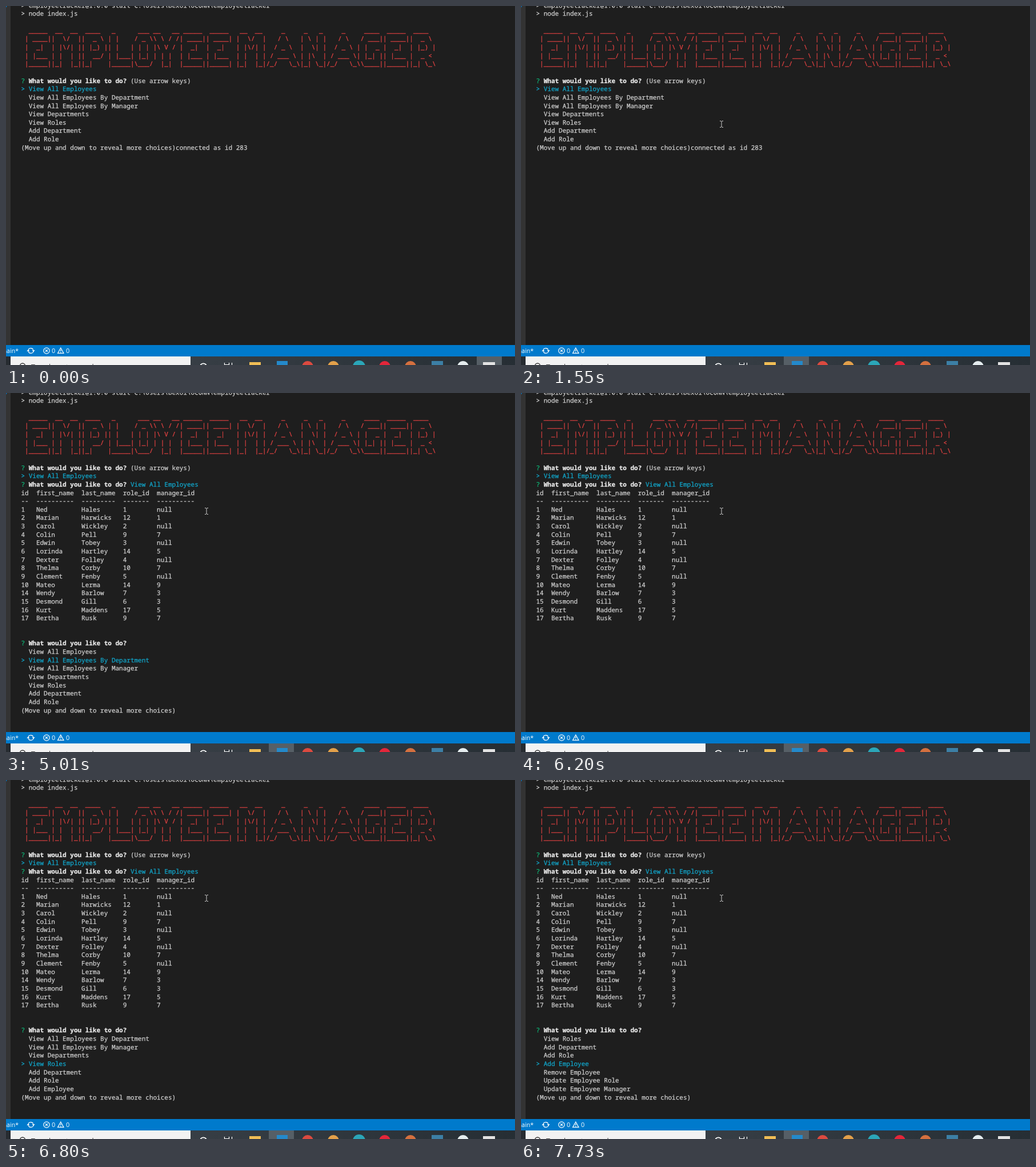
An HTML page for the animation above (7.99 s loop, 891 by 629 pixels).

```html
<!DOCTYPE html>
<html lang="en">
<head>
<meta charset="utf-8">
<title>Terminal menu</title>
<style>
  :root { --lh: 14.655px; --loop: 7990ms; --bg: #1e1e1e; }
  html, body { margin: 0; width: 100%; height: 100%; overflow: hidden; background: var(--bg); }
  #stage { position: relative; width: 891px; height: 629px; overflow: hidden; background: var(--bg); }

  pre {
    position: absolute; left: 26.5px; top: calc(7.3px + var(--row) * var(--lh)); margin: 0;
    font: 11px/14.655px "Noto Sans Mono", "DejaVu Sans Mono", monospace;
    text-rendering: geometricPrecision; font-variant-ligatures: none;
    color: #d0d0d0; -webkit-text-stroke: .25px;
  }
  b { color: #e8e8e8; }
  .red { color: #dc4040; -webkit-text-stroke: .35px; }
  .ask { color: #0dbc79; }
  .hot { color: #11a8cd; }

  /* every timeline shares one loop and jumps between states */
  .first, .second, .hint, .menu, .list, .pick, .lit, .beam, .arrow {
    animation: var(--loop) step-end infinite;
  }
  .first { animation-name: first; }
  .second { animation-name: second; }
  .hint { animation-name: hint; }
  .menu { animation-name: redraw; }

  .view { position: absolute; left: 0; top: var(--lh); width: 330px; height: calc(7 * var(--lh)); overflow: hidden; }
  .list { position: absolute; left: 13.2px; top: 0; animation-name: scroll; }
  .pick {
    position: absolute; left: 0; top: 0; width: 100%; height: var(--lh);
    overflow: hidden; background: var(--bg); color: #11a8cd; animation-name: move;
  }
  .pick .list { animation-name: choose; }

  @keyframes first { 0% { visibility: visible } 37.67%, 100% { visibility: hidden } }
  @keyframes second { 0% { opacity: 0 } 37.67%, 100% { opacity: 1 } }
  @keyframes hint { 0% { opacity: 1 } 62.7%, 100% { opacity: 0 } }
  @keyframes redraw {
    0%, 78.34%, 94.24%, 100% { visibility: visible }
    77.59%, 93.36% { visibility: hidden }
  }
  @keyframes scroll {
    0% { top: 0 }
    85.1% { top: calc(-1 * var(--lh)) }
    90.86% { top: calc(-2 * var(--lh)) }
    94.24% { top: calc(-3 * var(--lh)) }
    96.74%, 100% { top: calc(-4 * var(--lh)) }
  }
  @keyframes move {
    0% { top: 0 }
    62.7% { top: var(--lh) }
    78.34% { top: calc(2 * var(--lh)) }
    81.72%, 100% { top: calc(3 * var(--lh)) }
  }
  @keyframes choose {
    0% { top: 0 }
    62.7% { top: calc(-1 * var(--lh)) }
    78.34% { top: calc(-2 * var(--lh)) }
    81.72% { top: calc(-3 * var(--lh)) }
    85.1% { top: calc(-4 * var(--lh)) }
    90.86% { top: calc(-5 * var(--lh)) }
    94.24% { top: calc(-6 * var(--lh)) }
    96.74%, 100% { top: calc(-7 * var(--lh)) }
  }

  #chrome { position: absolute; left: 0; top: 0; }
  #chrome text { font-family: "Open Sans", "Noto Sans", sans-serif; font-size: 11px; fill: #fff; }
  .line { fill: none; stroke: #fff; stroke-width: 1.2; }
  .lit { fill: #565f66; }
  .mail { animation-name: dim; }
  .code { animation-name: glow; }
  @keyframes dim { 0% { opacity: 1 } 10.01% { opacity: .5 } 10.76%, 100% { opacity: 0 } }
  @keyframes glow { 0% { opacity: 0 } 10.01% { opacity: .5 } 10.76%, 100% { opacity: 1 } }

  .arrow { animation-name: arrow; }
  @keyframes arrow { 0%, 1.62%, 100% { visibility: hidden } .87% { visibility: visible } }
  .beam { animation-name: beam; }
  @keyframes beam {
    0% { transform: translate(502px, 133px); opacity: 0 }
    13.26% { transform: translate(502px, 133px); opacity: 1 }
    14.14% { transform: translate(462px, 123px); opacity: 1 }
    15.01% { transform: translate(377px, 100px); opacity: 1 }
    15.89% { transform: translate(261px, 69px); opacity: 1 }
    16.77% { transform: translate(151px, 40px); opacity: 1 }
    17.64% { transform: translate(70px, 19px); opacity: 1 }
    18.52% { transform: translate(20px, 5px); opacity: 1 }
    19.39%, 100% { transform: none; opacity: 1 }
  }
</style>
</head>
<body>
<div id="stage">
<pre style="--row:-1">
&gt; employeetracker@1.0.0 start C:\Users\bexol\UCONN\employeetracker
&gt; node index.js

<span class="red">  _____  __  __  ____   _      ___ __   __ _____  _____   __  __     _     _   _     _     ____  _____  ____  
 | ____||  \/  ||  _ \ | |    / _ \\ \ / /| ____|| ____| |  \/  |   / \   | \ | |   / \   / ___|| ____||  _ \ 
 |  _|  | |\/| || |_) || |   | | | |\ V / |  _|  |  _|   | |\/| |  / _ \  |  \| |  / _ \ | |  _ |  _|  | |_) |
 | |___ | |  | ||  __/ | |___| |_| | | |  | |___ | |___  | |  | | / ___ \ | |\  | / ___ \| |_| || |___ |  _ &lt; 
 |_____||_|  |_||_|    |_____|\___/  |_|  |_____||_____| |_|  |_|/_/   \_\|_| \_|/_/   \_\\____||_____||_| \_\</span>

<span class="ask">?</span> <b>What would you like to do?</b> (Use arrow keys)
<span class="hot">&gt; View All Employees</span></pre>

<pre class="first" style="--row:10">
  View All Employees By Department
  View All Employees By Manager
  View Departments
  View Roles
  Add Department
  Add Role
(Move up and down to reveal more choices)connected as id 283</pre>

<div class="second">
<pre style="--row:10">
<span class="ask">?</span> <b>What would you like to do?</b> <span class="hot">View All Employees</span>
id  first_name  last_name  role_id  manager_id
--  ----------  ---------  -------  ----------
1   Ned         Hales      1        null
2   Marian      Harwicks   12       1
3   Carol       Wickley    2        null
4   Colin       Pell       9        7
5   Edwin       Tobey      3        null
6   Lorinda     Hartley    14       5
7   Dexter      Folley     4        null
8   Thelma      Corby      10       7
9   Clement     Fenby      5        null
10  Mateo       Lerma      14       9
14  Wendy       Barlow     7        3
15  Desmond     Gill       6        3
16  Kurt        Maddens    17       5
17  Bertha      Rusk       9        7</pre>
<pre class="menu" style="--row:29"><span class="ask">?</span> <b>What would you like to do?</b> <span class="hint">(Use arrow keys)</span>







(Move up and down to reveal more choices)<div class="view"><div class="list">View All Employees
View All Employees By Department
View All Employees By Manager
View Departments
View Roles
Add Department
Add Role
Add Employee
Remove Employee
Update Employee Role
Update Employee Manager</div><div class="pick">&gt;</div></div></pre>
</div>

<svg id="chrome" width="891" height="629" viewBox="0 0 891 629">
  <defs>
    <linearGradient id="bar"><stop stop-color="#373e45"/><stop offset="1" stop-color="#262e34"/></linearGradient>
  </defs>
  <rect width="8" height="594" fill="#333"/>
  <circle cx="-4" cy="-2" r="6" fill="#007acc"/>

  <rect y="594" width="891" height="20" fill="#007acc"/>
  <text x="22" y="608" text-anchor="end" style="font-size:10.6px">main*</text>
  <g class="line">
    <path d="M38.8 603.5a4.7 4.7 0 0 1 9-1M48.2 604.5a4.7 4.7 0 0 1-9 1"/>
    <circle cx="71" cy="604" r="5.2"/>
    <path d="M68.8 601.8l4.4 4.4m0-4.4l-4.4 4.4"/>
    <path d="M95.8 599l5.2 9.4h-10.4zM95.8 602v3.2m0 1v1.2"/>
  </g>
  <path d="M45.6 603h5l-2.5 3zM36.4 605h5l-2.5-3z" fill="#fff"/>
  <text x="80" y="608">0</text>
  <text x="105" y="608">0</text>

  <rect width="8" y="614" height="15" fill="#262b30"/>
  <rect x="8" y="614" width="315" height="15" fill="#f2f2f2"/>
  <rect x="323" y="614" width="568" height="15" fill="url(#bar)"/>
  <circle cx="29" cy="630.5" r="4.5" fill="none" stroke="#333" stroke-width="1.3"/>
  <text x="44" y="637" style="font-size:12.5px;fill:#444">Type here to search</text>
  <rect class="lit code" x="460" y="614" width="44" height="15"/>
  <rect class="lit mail" x="824" y="614" width="44" height="15"/>
  <circle class="line" cx="345.5" cy="632" r="5.7" style="stroke-width:1.8"/>
  <path class="line" d="M382.5 625v3.5h8v-3.5M395.5 625v4"/>
  <rect x="426" y="624" width="20" height="12" fill="#f0bd55"/>
  <rect x="474" y="622" width="19" height="19" fill="#2489ca"/>
  <circle cx="528" cy="632" r="10" fill="#db4a40"/>
  <circle cx="573" cy="632" r="10" fill="#e2a04a"/>
  <circle cx="618" cy="632" r="11" fill="#2ba6b8"/>
  <circle cx="663" cy="632" r="10" fill="#e3263a"/>
  <circle cx="708" cy="632" r="10" fill="#d4703f"/>
  <rect x="745" y="622" width="20" height="20" fill="#3c7fa5"/>
  <circle cx="800" cy="632" r="10" fill="#e4ecee"/>
  <rect x="835" y="624" width="21" height="16" fill="#e2e2e2"/>

  <path class="arrow" d="M871.5 624v14l3-3h5z" fill="#fff" stroke="#111" stroke-width=".6"/>
  <path class="beam" d="M348 201.5h2l1 1 1-1h2M351 202v10M348 212.5h2l1-1 1 1h2" fill="none" stroke="#d0d0d0"/>
</svg>
</div>
<script>
  // The highlighted row is a one-line window onto a second copy of the list.
  const list = document.querySelector('.list');
  document.querySelector('.pick').append(list.cloneNode(true));
</script>
</body>
</html>
```
